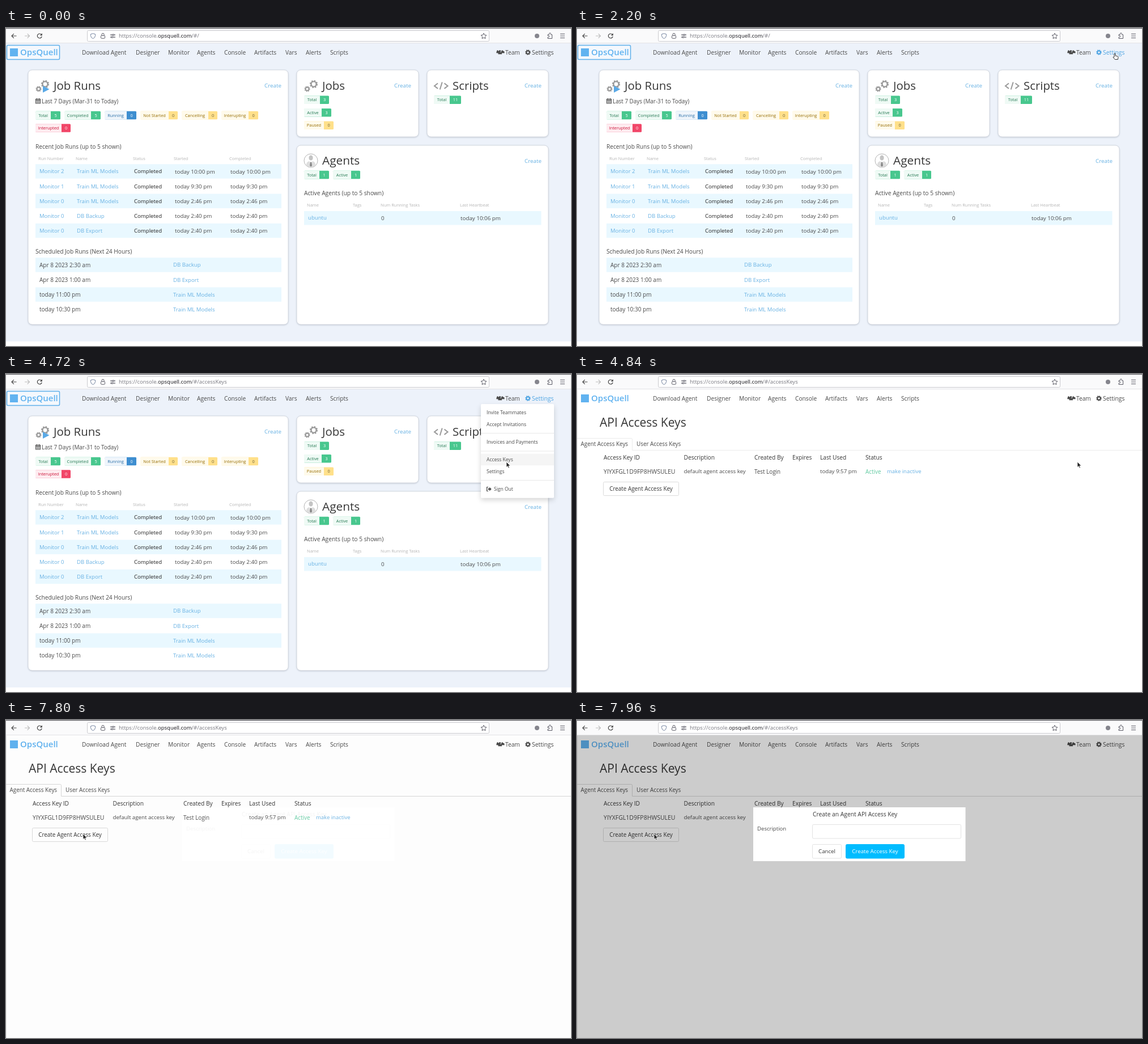
An HTML page that plays this animation: 997x561 px, repeating every 8000 ms.

```html
<!DOCTYPE html>
<html lang="en">
<head>
<meta charset="utf-8">
<title>Console</title>
<style>
html, body { margin: 0; width: 100%; height: 100%; overflow: hidden; background: #fff; }
svg { display: block; width: 100%; height: 100%; font-family: "Open Sans", "Noto Sans", sans-serif; }
text { white-space: pre; }
</style>
</head>
<body>
<svg id="stage" viewBox="0 0 997 561"></svg>
<script>
const LOOP = 8000;
const INK = '#4a4a4a', HEAD = '#363636', LINK = '#67b1e3', MUTE = '#b5b5b5', STRIPE = '#e9f8ff', GREY = '#999';

// Drawing helpers; text is centred vertically on y
const text = (x, y, s, size = 9.8, fill = INK, extra = '') =>
  `<text x="${x}" y="${(y + size * .36).toFixed(2)}" font-size="${size}" fill="${fill}" ${extra}>${s}</text>`;
const rect = (x, y, x2, y2, fill, extra = '') =>
  `<rect x="${x}" y="${y}" width="${x2 - x}" height="${y2 - y}" fill="${fill}" ${extra}/>`;
const line = (d, stroke, width = 1, extra = '') =>
  `<path d="${d}" fill="none" stroke="${stroke}" stroke-width="${width}" ${extra}/>`;
const shape = (d, fill, extra = '') => `<path d="${d}" fill="${fill}" ${extra}/>`;
const dot = (x, y, r, fill) => `<circle cx="${x}" cy="${y}" r="${r}" fill="${fill}"/>`;
const group = (id, body) => `<g id="${id}">${body}</g>`;

function gear(x, y, r, color, ring) {
  const tooth = 2 * Math.PI * r / 16;
  const circle = (radius, width, dash) => `<circle cx="${x}" cy="${y}" r="${radius}" fill="none" ` +
    `stroke="${color}" stroke-width="${width}" ${dash}/>`;
  return circle(r - ring / 2, ring, '') + circle(r, ring * 1.1, `stroke-dasharray="${tooth}"`);
}

const TONES = {
  ok: ['#effaf5', '#257953', '#48c78e', '#fff'],
  info: ['#eff5fb', '#296fa8', '#3e8ed0', '#fff'],
  warn: ['#fffaeb', '#946c00', '#ffe08a', '#6b5f3c'],
  bad: ['#feecf0', '#cc0f35', '#f14668', '#fff']
};
function tag(x, y, split, end, label, count, tone) {
  const [bg, ink, fill, num] = TONES[tone];
  return rect(x, y - 7.3, end, y + 7.3, fill, 'rx="1.6"') + rect(x, y - 7.3, split, y + 7.3, bg) +
    text((x + split) / 2, y, label, 7.4, ink, 'text-anchor="middle"') +
    text((split + end) / 2, y, count, 7.4, num, 'text-anchor="middle"');
}

const card = (x, y, x2, y2) =>
  rect(x, y, x2, y2, '#fff', 'rx="7" stroke="#cbd0d8" stroke-width=".8" filter="url(#soft)"');

function chrome() {
  const k = '#5b5b66';
  return rect(0, 0, 997, 27, '#fafafb') + rect(0, 0, 997, 1.2, '#66666b') + rect(0, 26, 997, 27, '#e3e3e6') +
    rect(143.5, 4.5, 852.5, 23.5, '#fff', 'rx="2" stroke="#c9c9ce"') +
    line('M18.5 14H10M13.8 10.2L10 14l3.8 3.8', '#444', 1.2) +
    line('M33 14h8.5M37.7 10.2L41.5 14l-3.8 3.8', '#bbb', 1.1) +
    line('M62.3 11.3A4 4 0 1 0 63.2 15', '#444', 1.2) + shape('M63.8 9.3v4h-4z', '#444') +
    line('M153.5 9.7l4 1.2v2.6q0 3.6-4 5.2q-4-1.6-4-5.2v-2.6z', '#6f7f9c') +
    rect(167.5, 13.3, 174.5, 18.3, 'none', `rx="1" stroke="${k}"`) + line('M169 13.3v-2a2 2 0 0 1 4 0v2', k) +
    line('M184 12.2h4M190 12.2h3M184 16.2h2.5M188.5 16.2h4.5', k, 1.2) +
    `<circle cx="189" cy="12.2" r="1.3" fill="none" stroke="${k}"/><circle cx="187.2" cy="16.2" r="1.3" fill="none" stroke="${k}"/>` +
    `<text y="17.4" x="199" font-size="9.5" fill="#77777f">https://console.<tspan fill="#15141a">opsquell.com</tspan><tspan id="path"></tspan></text>` +
    line('M843 9.2l1.5 3.1 3.4.5-2.5 2.4.6 3.4-3-1.6-3 1.6.6-3.4-2.5-2.4 3.4-.5z', k) +
    dot(937, 14, 4, '#85858d') +
    line('M956 11.7h2.4v-1.4a1.5 1.5 0 0 1 3 0v1.4h2.2v6.8h-7.6v-2.4h1.4a1.3 1.3 0 0 0 0-2.6H956z', k) +
    line('M978 10.5h8M978 14h8M978 17.5h8', k);
}

function nav() {
  const items = [[134, 'Download Agent'], [229, 'Designer'], [286, 'Monitor'], [337, 'Agents'], [385, 'Console'],
    [438, 'Artifacts'], [493, 'Vars'], [529, 'Alerts'], [572, 'Scripts']];
  const person = (x, y, s) => dot(x, y - 2.2 * s, 2 * s, INK) +
    shape(`M${x - 3.4 * s} ${y + 4 * s}v-1.4q0-2.4 2.4-2.4h${2 * s}q2.4 0 2.4 2.4v1.4z`, INK);
  return rect(7, 36, 21, 50, '#61b3f0') + text(25, 43, 'OpsQuell', 15, '#61b3f0', 'font-weight="600"') +
    items.map(([x, s]) => text(x, 43, s, 10.2)).join('') +
    person(867.4, 41.8, .6) + person(875.6, 41.8, .6) + person(871.5, 42.7, .9) + text(881, 43, 'Team', 10.2);
}

const settings = color => gear(921, 43, 3.7, color, 2) + text(928, 43, 'Settings', 10.4, color);

function jobRuns() {
  const rows = [['2', 'Train ML Models', '10:00'], ['1', 'Train ML Models', '9:30'], ['0', 'Train ML Models', '2:46'],
    ['0', 'DB Backup', '2:40'], ['0', 'DB Export', '2:40']];
  const plan = [['Apr 8 2023 2:30 am', 'DB Backup'], ['Apr 8 2023 1:00 am', 'DB Export'],
    ['today 11:00 pm', 'Train ML Models'], ['today 10:30 pm', 'Train ML Models']];
  const heads = [[57, 'Run Number'], [123, 'Name'], [224, 'Status'], [296, 'Started'], [394, 'Completed']];
  const stripe = (y, i) => i % 2 ? '' : rect(52, y - 12.8, 486, y + 12.6, STRIPE);
  return card(39, 74, 498, 523) +
    gear(57.5, 107.5, 4, GREY, 2) + gear(69, 99, 5.8, GREY, 2.4) + shape('M65 102l11.5 6-11.5 6z', '#5aa9e6') +
    text(84, 101.5, 'Job Runs', 20.4, HEAD) + text(456, 101.5, 'Create', 9.8, LINK) +
    rect(52.5, 125.5, 60.5, 133, 'none', `stroke="${INK}"`) + line('M52 127.5h9M54.5 124v2M58.5 124v2', INK, 1.3) +
    line('M55.2 128v5M57.9 128v5M52 130.5h9', INK, .7) +
    text(63, 129, 'Last 7 Days (Mar-31 to Today)', 9.9) +
    tag(52, 154, 79, 96, 'Total', 5, 'ok') + tag(103, 154, 150, 167, 'Completed', 5, 'ok') +
    tag(174, 154, 213, 230, 'Running', 0, 'info') + tag(237, 154, 287, 303, 'Not Started', 0, 'warn') +
    tag(310, 154, 357, 373, 'Cancelling', 0, 'warn') + tag(380, 154, 428, 445, 'Interupting', 0, 'warn') +
    tag(52, 176.5, 98, 114, 'Interupted', 0, 'bad') +
    text(52, 209, 'Recent Job Runs (up to 5 shown)', 10.15) +
    heads.map(([x, s]) => text(x, 230, s, 7.5, MUTE)).join('') +
    rows.map(([n, name, at], i) => {
      const y = 253 + 26.15 * i;
      return stripe(y, i) + text(59, y, 'Monitor ' + n, 9.5, LINK) + text(125, y, name, 9.6, LINK) +
        text(226, y, 'Completed', 9.6, '#222') + text(298, y, `today ${at} pm`) + text(396, y, `today ${at} pm`);
    }).join('') +
    text(52, 394, 'Scheduled Job Runs (Next 24 Hours)', 10.2) +
    plan.map(([at, name], i) => {
      const y = 418 + 26.1 * i;
      return stripe(y, i) + text(59, y, at, 10) + text(295, y, name, 9.6, LINK);
    }).join('');
}

function sideCards() {
  const heads = [[531, 'Name'], [612, 'Tags'], [661, 'Num Running Tasks'], [801, 'Last Heartbeat']];
  return card(513, 74, 728, 192) + gear(531.5, 107.5, 4, GREY, 2) + gear(543, 99, 5.8, GREY, 2.4) +
    text(558, 101.5, 'Jobs', 20.4, HEAD) + text(685, 101.5, 'Create', 9.8, LINK) +
    tag(526, 126.7, 554, 570, 'Total', 3, 'ok') + tag(526, 149.2, 557, 574, 'Active', 3, 'ok') +
    tag(526, 171.7, 561, 578, 'Paused', 0, 'warn') +
    card(743, 74, 957, 192) + line('M762 97.5l-6 4.7 6 4.7M773.5 97.5l6 4.7-6 4.7M769.7 95.5l-4 13', GREY, 2) +
    text(788, 101.5, 'Scripts', 20.4, HEAD) + text(915, 101.5, 'Create', 9.8, LINK) +
    tag(755, 126.7, 783, 803, 'Total', 11, 'ok') +
    card(513, 207, 957, 523) +
    '<circle cx="538" cy="234" r="12" fill="#fff" stroke="#aaa" stroke-width=".9"/>' +
    '<ellipse cx="538" cy="229" rx="3.6" ry="4.6" fill="#c4c4c4"/>' +
    shape('M529.5 242q.5-6 5.5-7l3 3 3-3q5 1 5.5 7q-3.5 3.7-8.5 3.7t-8.5-3.7z', '#dedede') +
    shape('M537 236.5h2l1 6-2 2.5-2-2.5z', '#888') +
    text(558, 234, 'Agents', 20.8, HEAD) + text(915, 234, 'Create', 9.8, LINK) +
    tag(526, 259, 553, 570, 'Total', 1, 'ok') + tag(577, 259, 609, 625, 'Active', 1, 'ok') +
    text(526, 291.5, 'Active Agents (up to 5 shown)', 10.25) +
    heads.map(([x, s]) => text(x, 312.5, s, 7.5, MUTE)).join('') +
    rect(526, 323, 944.5, 347.5, STRIPE) +
    text(533, 335, 'ubuntu', 9.6, LINK) + text(662, 335, '0') + text(802, 335, 'today 10:06 pm');
}

const MENU = [[68, 'Invite Teammates'], [89, 'Accept Invitations'], [120, 'Invoices and Payments'],
  [151, 'Access Keys'], [172, 'Settings'], [203, 'Sign Out']];
function menu() {
  return rect(838, 53, 967, 218.5, '#fff', 'rx="2" filter="url(#drop)"') +
    '<rect id="hover" x="838" width="129" height="20.6" fill="#f5f5f5"/>' +
    line('M838 104.5h129M838 136h129M838 187.5h129', '#e8e8e8') +
    MENU.map(([y, s]) => text(s === 'Sign Out' ? 861 : 848, y, s, 8.5)).join('') +
    line('M851 199.5h-2.5v7h2.5', INK, 1.2) + shape('M850.5 201.7h2.5v-2.2l3.7 3.5-3.7 3.5v-2.2h-2.5z', INK);
}

const button = (x, x2, y, y2, s, size, fill = '#fff', ink = HEAD, edge = '#dbdbdb') =>
  rect(x, y, x2, y2, fill, `rx="2" stroke="${edge}"`) +
  text((x + x2) / 2, (y + y2) / 2, s, size, ink, 'text-anchor="middle"');

function keysPage() {
  const heads = [[47, 'Access Key ID'], [188.5, 'Description'], [313, 'Created By'], [380, 'Expires'],
    [429, 'Last Used'], [509, 'Status']];
  return text(40, 85.5, 'API Access Keys', 21, HEAD) +
    line('M.5 28V561', '#ececec') +
    group('tabs', line('M0 113.5H95.5q2 0 2 2V134.5H997', '#d8d8d8')) +
    text(6.5, 123.5, 'Agent Access Keys', 9.9) + text(105, 123.5, 'User Access Keys', 9.9) +
    heads.map(([x, s]) => text(x, 147, s, 10.2, HEAD)).join('') +
    text(47, 172, 'YIYXFGL1D9FP8HWSULEU', 10.5) + text(188.5, 172, 'default agent access key', 9.7) +
    text(313, 172, 'Test Login', 9.9) + text(429, 172, 'today 9:57 pm', 9.7) +
    text(509, 172, 'Active', 9.9, '#5fc9a0') + text(547, 172, 'make inactive', 9.5, LINK) +
    button(46.5, 179.5, 190.5, 214.5, 'Create Agent Access Key', 9.9);
}

function modal() {
  return rect(0, 27, 997, 561, '#000', 'opacity=".2"') + rect(311, 154, 685.5, 249, '#fff') +
    text(416, 166.5, 'Create an Agent API Access Key', 10.3, HEAD) + text(318, 191.5, 'Description', 9.6) +
    rect(415.5, 184.5, 677.5, 209, '#fff', 'rx="2" stroke="#e2e2e2"') +
    button(415.5, 466.5, 219.5, 244, 'Cancel', 9.7, '#fff', HEAD, '#e2e2e2') +
    button(474.5, 577.5, 219.5, 244, 'Create Access Key', 9.8, '#00bcff', '#fff', '#00bcff');
}

const stage = document.getElementById('stage');
stage.innerHTML = `<defs>
  <filter id="soft" x="-5%" y="-5%" width="110%" height="115%"><feDropShadow dx="0" dy="1" stdDeviation="1" flood-color="#5a6475" flood-opacity=".28"/></filter>
  <filter id="drop" x="-10%" y="-10%" width="120%" height="125%"><feDropShadow dx="0" dy="4" stdDeviation="4" flood-opacity=".16"/></filter>
</defs>` +
  rect(0, 0, 997, 561, '#fff') +
  group('dash', rect(0, 27, 997, 553, '#edf2fa') +
    rect(1.5, 30.5, 94.5, 55.5, '#f4f8fd', 'rx="2" stroke="#5fb0ea" stroke-width="1.5"') + jobRuns() + sideCards()) +
  group('keys', keysPage()) + nav() +
  group('idle', settings(INK)) + group('lit', settings('#4fa5e3')) +
  group('menu', menu()) + chrome() + group('modal', modal()) +
  group('cursor',
    group('arrow', shape('M0 0V9.5L2.2 7.5 3.7 11 5.3 10.3 3.8 7H6.8z', '#222', 'stroke="#fff" stroke-width=".7"')) +
    group('beam', line('M-1.7-4.5h3.4M0-4.5v9M-1.7 4.5h3.4', '#555', .9)) +
    group('hand', shape('M-1 .8q0-1 1-1t1 1V4l4 .9q1.2.4 1 1.7L5.3 10.5H.3L-3 6.7q.3-1.3 2-.4z', '#fff',
      'stroke="#222" stroke-width=".9"')));

const el = id => document.getElementById(id);
const show = (id, on) => el(id).setAttribute('display', on ? 'inline' : 'none');
const clamp = v => Math.max(0, Math.min(1, v));
const ease = p => p * p * (3 - 2 * p);

// Pointer moves: start, end, target x, target y
const MOVES = [[1640, 1800, 952, 55], [1960, 2120, 949, 45], [3280, 3960, 881, 157], [4280, 4360, 883, 155],
  [5560, 5800, 487, 176], [5960, 6120, 283, 192], [6280, 6840, 136, 201]];
function pointer(t) {
  let x = 918, y = 134;
  for (const [a, b, tx, ty] of MOVES) {
    const p = ease(clamp((t - a) / (b - a)));
    x += (tx - x) * p;
    y += (ty - y) * p;
  }
  return [x, y];
}

function draw(t) {
  const onKeys = t >= 4760, open = t >= 2800 && !onKeys;
  const [x, y] = pointer(t);
  const overSettings = !onKeys && t >= 1960 && y < 53;
  const overText = onKeys && x > 300 && x < 610 && y > 166 && y < 181;
  show('dash', !onKeys);
  show('keys', onKeys);
  show('menu', open);
  show('lit', overSettings || open);
  show('idle', !(overSettings || open));
  el('path').textContent = t < 4680 ? '/#/' : '/#/accessKeys';
  el('tabs').setAttribute('opacity', t < 7780 ? .5 : 1);

  const item = open && MENU.find(([my]) => Math.abs(my - y) < 10.3);
  show('hover', item);
  if (item) el('hover').setAttribute('y', item[0] - 10.3);

  show('cursor', t >= 1640);
  show('hand', overSettings);
  show('beam', overText);
  show('arrow', !overSettings && !overText);
  el('cursor').setAttribute('transform', `translate(${x.toFixed(2)} ${y.toFixed(2)})`);

  const fade = Math.sin(clamp((t - 7796) / 160) * Math.PI / 2);
  show('modal', fade > 0);
  el('modal').setAttribute('opacity', fade.toFixed(3));
}

const start = performance.now();
function tick() {
  draw((performance.now() - start) % LOOP);
  requestAnimationFrame(tick);
}
tick();
</script>
</body>
</html>
```
